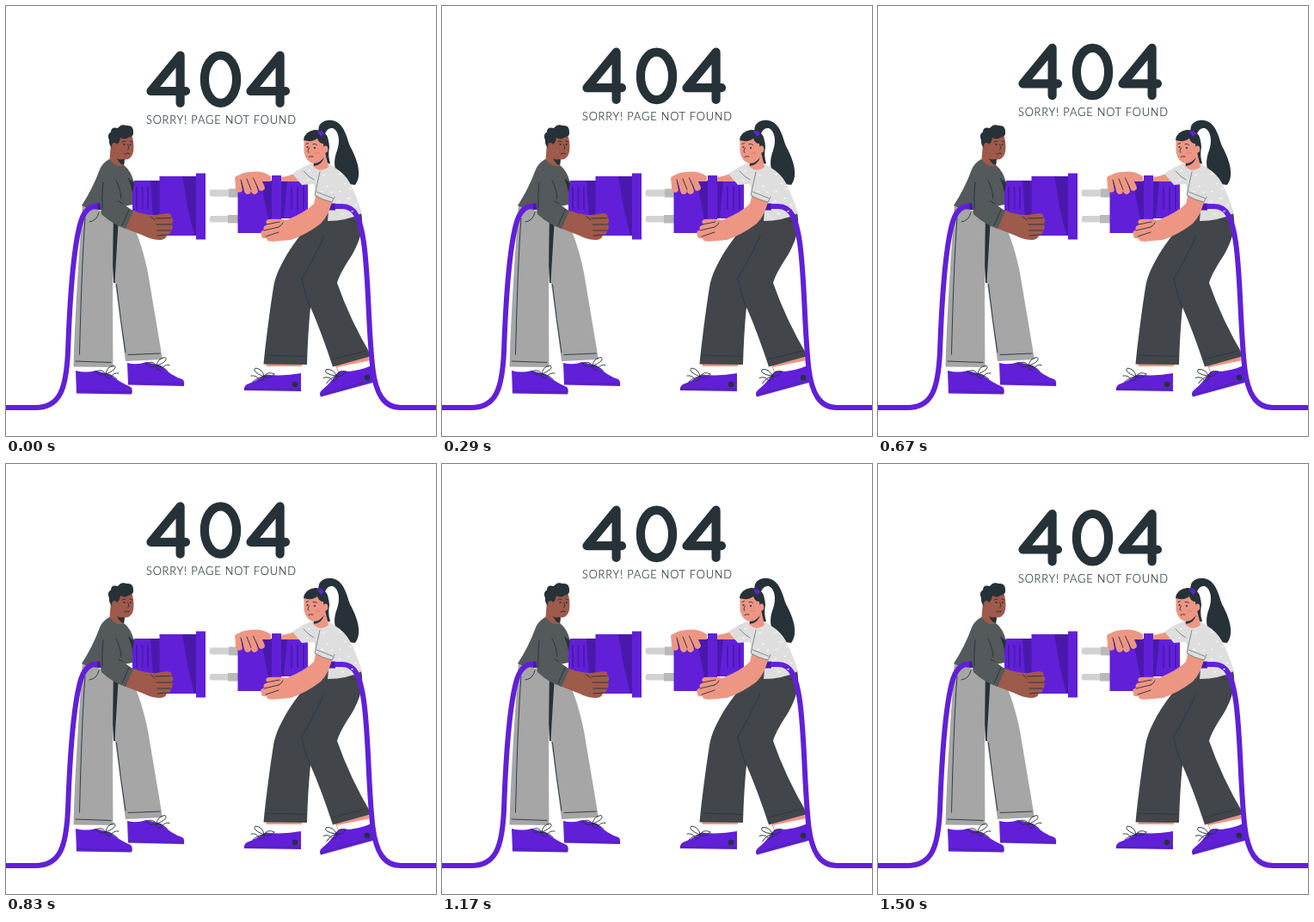
Recreate the animation shown at these times as an HTML page. Size 500 by 500 pixels, loop 1540 ms.

```html
<!DOCTYPE html>
<html lang="en">
<head>
<meta charset="utf-8">
<title>404</title>
<style>
  html, body { margin: 0; width: 100%; height: 100%; overflow: hidden; background: #fff; }
  svg { display: block; width: 100%; height: 100%; }
  .p { fill: #6120d8; }
  .d { fill: #4b18ac; }
  .k { fill: #263238; }
  .ln { fill: none; stroke: #263238; stroke-width: .9; stroke-linecap: round; stroke-linejoin: round; }
  .cable { fill: none; stroke: #6120d8; stroke-width: 6; }
  .slot { fill: none; stroke: #4b18ac; stroke-width: 1.8; stroke-linecap: round; }
  .skin { fill: #9e5a4a; }
  .rose { fill: #ed9684; }
  .grey { fill: #a6a6a6; }
  .shirt { fill: #54595b; }
  .tee { fill: #dedede; }
  .jean { fill: #42464a; }
  .fingers { fill: none; stroke: #ed9684; stroke-width: 7.6; stroke-linecap: round; }
  .digits { fill: none; stroke: #263238; stroke-width: 10.2; stroke-linecap: round; stroke-linejoin: round; }
  .sub { font: 300 12.8px Lato, "Open Sans", sans-serif; letter-spacing: .82px; fill: #263238; stroke: #263238; stroke-width: .15; }
</style>
</head>
<body>
<svg viewBox="0 0 500 500">
  <defs>
    <path id="four" d="M202.600 113.300V58L168.500 99.500H209"/>
    <path id="laces" class="ln" d="M0 6Q8 2 12 9Q5 12 0 6M12 9Q13 0 22 -1Q27 3 12 9M12 9Q19 9 25 15M12 9Q10 13 17 14M18 12Q21 7 27 8"/>
  </defs>

  <g id="title">
    <g class="digits" role="img" aria-label="404">
      <use href="#four"/>
      <ellipse cx="249.500" cy="85.700" rx="18.600" ry="27.700"/>
      <use href="#four" x="116"/>
    </g>
    <text class="sub" x="163" y="137.600">SORRY! PAGE NOT FOUND</text>
  </g>

  <g id="left-plug">
    <path class="p" d="M147 207Q147 203 151 203H180V247H147Z"/>
    <path class="d" d="M168 203H180V247H171Z"/>
    <path class="slot" d="M152 211V236M158.500 211V236M165 211V236"/>
    <path class="p" d="M178.500 198H221V267H178.500Z"/>
    <path class="d" d="M205 198H221.500V267H219L211.500 236Z"/>
    <path class="p" d="M221 194.500H232V271.500H221Z"/>
  </g>

  <g id="man">
    <path class="k" d="M121 246H133L127.500 322H125Z"/>
    <path class="grey" d="M131 245L147 252C157 275 164 300 167.500 325L182 411L139 413Q131 350 126.500 320Z"/>
    <path class="grey" d="M89 230L125 244Q123.500 310 124.500 420L78.500 419.500C80 360 85 290 89 230Z"/>
    <path class="ln" d="M92 247Q88 300 85.500 405M97 251Q106 250 108 240M81 413L122 414.500M142 405.500L179 404M128.500 324Q133 365 139 403"/>
    <path class="p" d="M81 424Q93 427 104 424L120 428Q133 438 145 443Q148 446 146 451.500L82 450.500Z"/>
    <path class="p" d="M141 415Q152 418 163 414L180 418Q192 430 205 434Q208 436 207 442L142 440.500Z"/>
    <path class="ln" d="M82 447.500L146 449M142 438L206 439.500" stroke-opacity=".45"/>
    <use href="#laces" x="104" y="419"/>
    <use href="#laces" x="163" y="409.500"/>

    <path class="shirt" d="M120 178Q112 183 109 190Q101 212 88 232Q99 238 116 237L147 231V212L149 206Q146 192 137 185Z"/>
    <path class="k" d="M142 200L149 206L147 217Q145 207 142 200Z"/>
    <path class="skin" d="M122 160L120.500 178Q127 188 137 186L139 172Z"/>
    <path class="k" d="M129 177Q134 180 138 177L137 185Q132 184 129 177Z"/>
    <path class="skin" d="M126 153Q136 147 147 152Q150 165 147 173Q144 179 138 178.500Q129 177 126 166Z"/>
    <path class="k" d="M126 167Q119 163 120 156Q117 149 122 146.500Q122 140 130 142Q134 136.500 140 139Q148 138 148 146Q149 152 142 153Q138 156 133 153Q132 160 128 161Z"/>
    <ellipse class="skin" cx="126" cy="163" rx="3" ry="4"/>
    <path class="ln" d="M135 158Q137 156 139 157.500M144 157L146.500 158M141.500 161Q144.500 166 141.500 167M138 172Q141 170.500 143.500 171.500"/>
    <circle class="k" cx="137.500" cy="161" r="1.100"/>
    <circle class="k" cx="144.800" cy="161" r="1"/>
  </g>

  <path class="cable" d="M0 467H34C63 467 70 445 72 402C74 345 78 285 86 254C90 239 96 232.800 105 232.800H114"/>
  <path class="d" d="M106 229.500H115V236.500H106Z"/>

  <g id="man-arm">
    <path class="skin" d="M146 237Q160 243 174 243L188 241Q194 242 192 246Q196 249 193 253Q195 258 192 261Q192 266 187 266Q187 271 180 272Q169 272 160 267L137 258Z"/>
    <path class="ln" d="M174 247L191 246.500M175 254H193M176 261H191M176 267L187 266M168 245Q172 247 173 249"/>
    <path class="shirt" d="M113 192Q127 196 129 208L136 230L148 238.500L139 259Q124 254 111 242Q107 222 113 192Z"/>
    <path class="ln" d="M113 205Q111 222 112 236M128 203Q133 212 134 224M143 237L135 255M136 230L131 227"/>
  </g>

  <g id="right-plug">
    <path fill="#d2d2d2" d="M238 213.500H262V221.500H238Q235 217.500 238 213.500ZM238 244H262V251.500H238Q235 248 238 244Z"/>
    <path fill="#b9b9b9" d="M259 212.500H270V222.500H259ZM258 243H270V252.500H258Z"/>
    <path class="rose" d="M318 199Q331 198 344 191L349 205L318 205Z"/>
    <path class="p" d="M269.500 203H310V264H269.500Z"/>
    <path class="d" d="M296 203H310V262H308L303 238Z"/>
    <path class="p" d="M320 204H347Q351 204 351 208V247H320Z"/>
    <path class="d" d="M320 204H327L323 247H320Z"/>
    <path class="slot" d="M332 211V236M339 211V236M346 211V236"/>
    <path class="p" d="M309 197H320V262H309Z"/>
  </g>

  <g id="woman">
    <path class="rose" d="M302 411H344V421H303ZM382 415L421 406L424 418L386 426Z"/>
    <path fill="#fff" d="M302 419H344V429H302ZM385 420L424 412L426 423L388 430Z"/>
    <path class="p" d="M302 428.500Q322 431 343 427V448L277 447Q276 443 280 440Q291 436 299 430Z"/>
    <path class="p" d="M387 425Q408 426 425 418L430 437L366 454.500Q363 450 368 446Q377 439 384 428Z"/>
    <path class="ln" d="M278 445L342 445.500M366 452L429 434" stroke-opacity=".45"/>
    <circle class="k" cx="336" cy="440" r="3.300"/>
    <circle class="k" cx="420" cy="432" r="3.300"/>
    <use href="#laces" transform="translate(312 422) scale(-1 1)"/>
    <use href="#laces" transform="translate(394 419) rotate(-12) scale(-1 1)"/>
    <path class="jean" d="M366 240L413 240C417 260 410 276 402 290Q388 311 385 322Q400 365 425 407L380 419.500Q367 380 354 350Q351 380 350 417L299.500 416.500C302 390 307 352 311 327C315 301 341 264 366 240Z"/>
    <path class="ln" d="M370 267Q361 288 344 317Q347 334 354 352M302 406L349 407.500M379 411L419 401M397 247Q405 252 414 251" stroke-opacity=".75"/>

    <path class="k" d="M364 148C361 136 371 132 379 133C393 135 396 152 400 163C410 181 414 198 406 208Q397 208 389 200C380 191 381 178 385 168C389 157 387 145 380 142Q373 141 370 151Z"/>
    <path class="k" d="M366 150Q376 152 376 164Q374 174 377 183L370 186Z"/>
    <path class="tee" d="M357 182L346 187Q339 191 333 195L344 208L358 207L363 225L376 227L374 250Q396 250 414 241Q408 222 400 206Q394 195 384 189L373 182Z"/>
    <path class="rose" d="M359 174L357 186Q365 195 375 187L371 170Z"/>
    <path class="k" d="M358 181.500Q365 182 370 176Q367 185 358 186Z"/>
    <path class="rose" d="M346.500 154Q357 148 370 153L372 169Q368 183 358 183Q349 182 346.500 170Z"/>
    <path class="k" d="M346 156Q347 146 359 144Q374 144 375 158L373 168Q369 167 369 160Q364 160 362 154Q356 159 346 156Z"/>
    <ellipse class="rose" cx="371.500" cy="166.500" rx="2.800" ry="4"/>
    <path class="p" d="M362 146L367 145L370 149L366 152Z"/>
    <path class="ln" d="M349 160.500L351.500 159.500M357 160.500Q359.500 159.500 361.500 161.500M352.500 165Q349.500 170 352 170.500M352 175.500Q354.500 174 357 175"/>
    <circle class="k" cx="350.500" cy="164" r="1"/>
    <circle class="k" cx="359" cy="165" r="1.100"/>
    <path fill="#e4705f" opacity=".35" d="M359 170H365V172H359Z"/>
  </g>

  <path class="d" d="M374 229.500H383V237.500H374Z"/>
  <path class="cable" d="M382 233H391C406 233 412 247 416 275C422 318 421 375 426.500 422C430 450 439 467 459 467H500"/>

  <g id="woman-arms">
    <path class="rose" d="M361 217L380 222Q377 242 366 253Q349 266 331 272L314 273.500Q303 275 303 270Q296 271 297 266Q294 263 300 260Q298 256 304 254Q300 250 305 248Q319 247 326 249Q348 240 358 230Z"/>
    <path class="ln" d="M300 261L317 257M303 254L318 251M302 268L317 263M317 257Q321 255 322 252"/>
    <path class="tee" d="M361 191Q375 190 381 207L383 222L379 228Q369 226 359 220Z"/>
    <path class="ln" d="M365 193L359 220Q369 226 379 228L382 222M361 216L380 223.500M346 192Q352 199 358 202" stroke-opacity=".55"/>
    <path class="rose" d="M266 200Q274 193 284 193Q297 191 308 198V204H294L268 204Z"/>
    <path class="fingers" d="M270 201L271 213M277 200L281 215M284 199L289 215M291 198L297 211"/>
    <path class="ln" d="M273 202L275.500 213M280 201L285 213.500M287.500 200L293 212"/>
    <g id="specks" fill="#fff"></g>
  </g>
</svg>
<script>
  const LOOP = 1540, STEP = 1000 / 24, RISE = 10, PEAK = 1500;
  const title = document.getElementById('title');

  const specks = [[352, 192], [350, 203], [369, 197], [373, 210], [367, 216], [378, 217], [388, 196],
    [394, 207], [388, 216], [400, 213], [398, 224], [387, 227], [406, 232], [391, 242], [402, 239]];
  document.getElementById('specks').innerHTML = specks
    .map(([x, y]) => `<path d="M${x - 1.5} ${y}l3 -1.500v2z"/>`).join('');

  // Linear up and down, shown at 24 steps per second
  function draw(now) {
    const t = Math.floor((now % LOOP + 5) / STEP) * STEP;
    const phase = ((t - PEAK + LOOP) % LOOP) / LOOP;
    const lift = RISE * (1 - Math.abs(1 - 2 * phase));
    title.setAttribute('transform', `translate(0 ${-lift.toFixed(2)})`);
  }

  const start = performance.now();
  function tick() {
    draw(performance.now() - start);
    requestAnimationFrame(tick);
  }
  tick();
</script>
</body>
</html>
```
